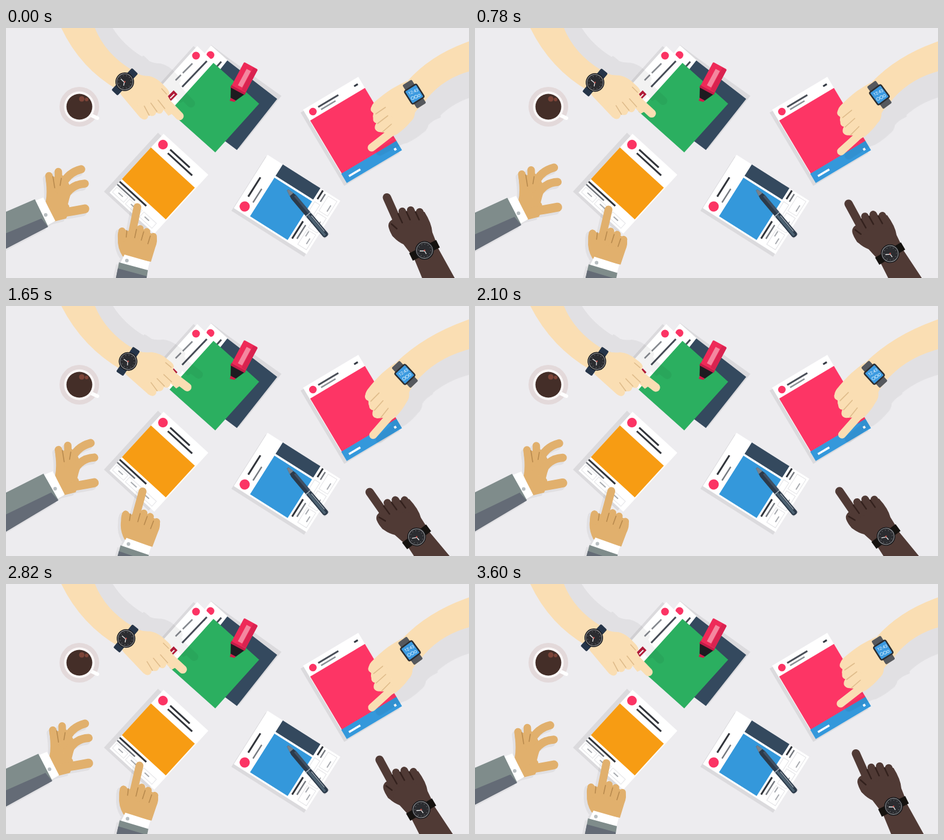
Write an HTML page that moves like this. It is 770 px wide and 416 px high and loops after 3.63 s.

```html
<!DOCTYPE html>
<html lang="en">
<head>
<meta charset="utf-8">
<title>Hands at the table</title>
<style>
html, body { margin: 0; width: 100%; height: 100%; overflow: hidden; background: #edecef; }
svg { display: block; }
.limb { fill: none; stroke-linecap: round; stroke-linejoin: round; }
.crease { fill: none; stroke-width: 1.6; stroke-linecap: round; }
.light { fill: #fadeb3; stroke: none; }
.light .limb { stroke: #fadeb3; }
.light .crease { stroke: #dfbc8b; }
.tan { fill: #e1b06d; }
.tan .limb { stroke: #e1b06d; }
.tan .crease { stroke: #b88a4e; }
.dark { fill: #503a35; }
.dark .limb { stroke: #503a35; }
.dark .crease { stroke: #33211d; stroke-width: 2.4; }
.shade { fill: #000; opacity: .075; }
</style>
</head>
<body>
<svg width="770" height="416" viewBox="0 0 770 416" xmlns="http://www.w3.org/2000/svg">
<defs>
  <filter id="shadow" x="-10%" y="-10%" width="120%" height="120%">
    <feColorMatrix values="0 0 0 0 0  0 0 0 0 0  0 0 0 0 0  0 0 0 .05 0"/>
  </filter>
  <g id="face">
    <circle r="15.5" fill="#17191d"/>
    <circle r="13.5" fill="#2b2c30" stroke="#9a9b9d" stroke-width="1"/>
    <circle r="10.5" fill="none" stroke="#85878a" stroke-width="1.4" stroke-dasharray=".8 4.7"/>
    <path d="M-8 1H0L3 6" fill="none" stroke="#e9e9e9" stroke-width="1.3"/>
    <circle r="1.3" fill="#c9504a"/>
  </g>
</defs>
<rect width="770" height="416" fill="#edecef"/>

<!-- coffee -->
<circle cx="122" cy="131" r="33" fill="#e3d9da"/>
<path d="M137 143L152 150" stroke="#fff" stroke-width="6" stroke-linecap="round"/>
<circle cx="122" cy="131" r="25.5" fill="#fbf8f8"/>
<circle cx="122" cy="131" r="21.5" fill="#442e28"/>
<circle cx="126" cy="118" r="4.5" fill="#7c4438"/>
<circle cx="134" cy="119" r="3" fill="#7c4438"/>

<!-- navy and green sheets -->
<path class="shade" d="M341 28L370 50L458 113L388 201L300 150z"/>
<path d="M341 29L369 54L300 140L272 115z" fill="#fff"/>
<path d="M368 54L451 118L384 203L300 140z" fill="#34495e"/>
<path d="M350 65L358 56" stroke="#4a4f58" stroke-width="3"/>
<circle cx="340" cy="45" r="6.5" fill="#fb3464"/>
<path class="shade" d="M312 30L341 56L270 135L240 110z"/>
<path d="M318 30L347 58L273 139L245 111z" fill="#fff"/>
<circle cx="316" cy="46" r="6.5" fill="#fb3464"/>
<g fill="none">
  <path d="M334 55L293 98" stroke="#474d57" stroke-width="3"/>
  <path d="M310 59L294 75M291 78L282 87" stroke="#868a90" stroke-width="2.5"/>
  <path d="M271 118L282 107" stroke="#b91c3c" stroke-width="9"/>
  <path d="M273 117L280 110" stroke="#fff" stroke-width="2"/>
</g>
<path d="M345 58L421 126L348 207L272 139z" fill="#2baf60"/>
<g transform="translate(376.5 121) rotate(28)">
  <path d="M-5 -5L-4 2L4 0L5 -5z" fill="#d11d48"/>
  <path d="M-13 -19H13L5 -3H-5z" fill="#1d1b20"/>
  <rect x="-13.5" y="-23" width="27" height="5" fill="#c41d49"/>
  <rect x="-13" y="-66" width="26" height="44" rx="2" fill="#ee2a58"/>
  <rect x="5" y="-65" width="8" height="42" fill="#d92350"/>
  <rect x="-4" y="-58" width="8" height="31" fill="#f4879f"/>
</g>

<!-- pink sheet -->
<g transform="translate(494 136) rotate(-30.8)">
  <rect class="shade" x="-6" y="2" width="107" height="142"/>
  <rect width="107" height="142" fill="#fff"/>
  <rect x="1" y="21.5" width="106" height="103" fill="#fd3565"/>
  <rect y="124" width="107" height="18" fill="#3498db"/>
  <circle cx="12.5" cy="11" r="6.3" fill="#fb3464"/>
  <path d="M24 9H63" stroke="#4a4f58" stroke-width="3"/>
  <path d="M26 15H54" stroke="#8d9197" stroke-width="2.5"/>
  <path d="M93 10H100" stroke="#343a44" stroke-width="3"/>
  <path d="M9 134H31" stroke="#fff" stroke-width="3.5"/>
  <rect x="96" y="133" width="4" height="4" fill="#fff"/>
</g>

<!-- orange sheet -->
<g transform="translate(262 176) rotate(42.5)">
  <rect class="shade" x="-8" y="5" width="101" height="133"/>
  <rect width="101" height="133" fill="#fff"/>
  <rect y="31" width="99" height="71.5" fill="#f79c13"/>
  <circle cx="11.5" cy="14" r="8" fill="#fb3464"/>
  <path d="M26 12H70M27 19H82M0 108H60" stroke="#33363c" stroke-width="3"/>
  <path d="M0 114H40" stroke="#6f7379" stroke-width="2.5"/>
  <path d="M11 123H21M39 123H52M70 123H80" stroke="#a8abb0" stroke-width="2"/>
  <path d="M3 118H28V129H3zM32 118H60V129H32zM64 118H92V129H64z" fill="none" stroke="#e4e4e7"/>
</g>

<!-- blue sheet -->
<g transform="translate(435 211) rotate(32.3)">
  <rect class="shade" x="-1" y="4" width="143" height="107"/>
  <rect width="143" height="105" fill="#fff"/>
  <rect x="30" width="74" height="22.5" fill="#34495e"/>
  <rect x="30" y="26" width="74" height="76" fill="#3498db"/>
  <circle cx="13.8" cy="93" r="8.5" fill="#fb3464"/>
  <path d="M10 38V76M109.5 1V18M109 62V96" stroke="#33363c" stroke-width="3"/>
  <path d="M22 53V80M116 4V19M116 65V92" stroke="#777b81" stroke-width="2.5"/>
  <path d="M134 15V27M126 71V81M134 47V58M134 80V91" stroke="#a8abb0" stroke-width="2"/>
  <path d="M122 4H139V33H122zM122 37H139V66H122zM122 70H139V99H122zM108 24H118V54H108z" fill="none" stroke="#e2e2e5"/>
</g>
<path class="shade" d="M474 283L530 351L538 343L484 279z"/>
<g transform="translate(468.5 269.5) rotate(50)">
  <path d="M0 -1.5L15 -5H97Q101 -5 101 0T97 5H15L0 1.5z" fill="#2c3a4a"/>
  <path d="M54 -1H98V3H54z" fill="#4d6272"/>
  <path d="M15 -5H52V-1H15z" fill="#3f5165"/>
  <path d="M53 -5V5" stroke="#a8b1ba" stroke-width="1.5"/>
  <path d="M58 -2.500H92" stroke="#9ba6b0" stroke-width="1.500"/>
  <path d="M0 -1.500L10 -4V4L0 1.500z" fill="#77818c"/>
</g>

<use href="#topLeft" x="19" y="-21" filter="url(#shadow)"/>
<use href="#topRight" transform="rotate(10 575 280)" filter="url(#shadow)"/>
<use href="#sleeved" x="-4" y="5" filter="url(#shadow)"/>
<use href="#below" x="-5" y="3" filter="url(#shadow)"/>

<g id="topLeft" class="light">
  <path id="armLeft"/>
  <g id="handLeft">
    <path d="M184 99L209 67Q218 80 238 80Q252 83 264 97Q276 108 269 113L284 139L270 146L262 136Q258 143 252 140L246 143Q240 148 235 145Q232 156 223 149L192 112z"/>
    <path class="limb" d="M262 119L288.500 146.500" stroke-width="14"/>
    <path class="limb" d="M248 127L255 136M236 130L243 140M222 134L230 146" stroke-width="13"/>
    <path class="crease" d="M241 125L251 139M230 130L238 145M253 120L264 134M259 101L267 110"/>
    <g transform="translate(197.500 89.500) rotate(43)">
      <rect x="-7" y="-25" width="14" height="50" rx="2" fill="#263549"/>
      <use href="#face"/>
    </g>
  </g>
</g>

<g id="topRight" class="light">
  <path id="armRight"/>
  <g id="handRight">
    <path d="M667 88Q654 94 642 101Q628 110 613 123Q603 133 611 142Q608 152 616 158Q609 169 620 173L630 174L640 181L650 177Q664 167 672 157Q680 150 680 141Q685 133 696 126z"/>
    <path class="limb" d="M644 171L608 199" stroke-width="13"/>
    <path class="limb" d="M630 123L613 135M633 139L617 152M638 153L621 166" stroke-width="13"/>
    <path class="crease" d="M631 132L615 143M635 146L618 159M641 160L626 173"/>
    <g transform="translate(679 110) rotate(-32)">
      <rect x="-9" y="-23" width="18" height="46" rx="2" fill="#55585d"/>
      <rect x="-13" y="-14" width="26" height="28" rx="4" fill="#2b2d31"/>
      <rect x="-10.500" y="-11.500" width="21" height="23" rx="1" fill="#3c9ae0"/>
      <g transform="rotate(10)">
        <text y="-2" font-family="Roboto, sans-serif" font-size="7" text-anchor="middle" fill="#fff">12:43</text>
        <g fill="none" stroke="#b9e0f8"><circle cx="-5" cy="5" r="2.500"/><circle cx="1" cy="5" r="2.500"/><circle cx="6.500" cy="5" r="2"/></g>
      </g>
    </g>
  </g>
</g>

<g id="sleeved" class="tan">
  <path d="M66 289Q69 275 66 250L94 245L104 258Q111 270 105 285L103 293Q109 298 100 317L80 322z"/>
  <path class="limb" d="M71.500 246L76 276M87 239L88 270" stroke-width="12.500"/>
  <path class="limb" d="M91 270Q98 242 125 235" stroke-width="13.500"/>
  <path class="limb" d="M96 283Q108 260 131 259" stroke-width="13.500"/>
  <path class="limb" d="M90 308Q105 306 131 301" stroke-width="15"/>
  <path class="crease" d="M78 247L81 266M92 250L90 262"/>
  <path d="M47 288L62 282L82 321L68 329z" fill="#fff"/>
  <circle cx="66" cy="311" r="3" fill="#b9bfc2"/>
  <g id="sleeve">
    <path d="M-40 323L48 285L70 330L-40 388z" fill="#7f8c8b"/>
    <path d="M-40 358L59 317L70 331L-40 388z" fill="#646b76"/>
  </g>
</g>

<g id="below" class="tan">
  <path d="M186 350Q185 333 193 332L202 338L218 330L250 346Q253 354 248 366L241 389L194 380Q185 366 186 350z"/>
  <path class="limb" d="M218.500 298L209 345" stroke-width="13"/>
  <path class="limb" d="M193 338L194 350" stroke-width="12"/>
  <path class="limb" d="M223 334L218 352M234 339L230 355M245 347L240 363" stroke-width="12"/>
  <path class="crease" d="M201 337L200 348M217 335L214 349M229 339L225 353M240 346L236 359"/>
  <path d="M197 377L239 389L235 404L190 392z" fill="#fff"/>
  <circle cx="201" cy="387" r="3" fill="#b9bfc2"/>
  <path d="M188 390L236 403L230 440H178z" fill="#7f8c8b"/>
  <path d="M186 400L234 413L230 440H178z" fill="#646b76"/>
</g>

<g id="deep" class="dark">
  <path d="M644 318Q633 323 637 334Q642 351 661 360L678 382L706 450H765L719 367Q714 352 709 340Q708 325 696 306L657 304z"/>
  <path class="limb" d="M633.500 282L654 328" stroke-width="14"/>
  <path class="limb" d="M659 305L666 323M673 303L680 320M688 306L695 323" stroke-width="12.500"/>
  <path class="limb" d="M642 329L647 343" stroke-width="11"/>
  <path class="crease" d="M652 309L659 324M666 306L672 319M681 306L687 319M641 326L650 334"/>
  <g transform="translate(696 370) rotate(64)">
    <rect x="-7" y="-25" width="14" height="50" fill="#15120f"/>
    <use href="#face" transform="rotate(-64)"/>
  </g>
</g>
</svg>
<script>
const el = id => document.getElementById(id);
const LOOP = 3630, SWING = 3600, STEP = 30;

// Swinging parts: pivot and full turn in degrees
const turns = {
  handLeft: [218, 54, -8.7],
  handRight: [691, 193, -11.2],
  below: [69, 431, 3.95],
  deep: [763, 445, -11.2],
  sleeve: [60, 308, -3.5]
};

// Each arm edge: wrist, bend, and the end that stays outside the stage
const arms = {
  armLeft: ['handLeft', [[186, 103], [123, 67], [91, -2]], [[208, 69], [164, 42], [147, -2]]],
  armRight: ['handRight', [[668, 88], [708, 43], [774, 21]], [[694, 126], [722, 85], [774, 71]]]
};

function spin([x, y], [cx, cy, deg], amount) {
  const a = deg * amount * Math.PI / 180, c = Math.cos(a), s = Math.sin(a);
  const dx = x - cx, dy = y - cy;
  return [cx + dx * c - dy * s, cy + dx * s + dy * c];
}

function armPath([hand, a, b], p) {
  const follow = ([wrist, bend, end]) => {
    const w = spin(wrist, turns[hand], p);
    const k = [bend[0] + (w[0] - wrist[0]) / 2, bend[1] + (w[1] - wrist[1]) / 2];
    return [w, k, end];
  };
  const [w1, k1, e1] = follow(a), [w2, k2, e2] = follow(b);
  return `M${w1}Q${k1} ${e1}L${e2}Q${k2} ${w2}z`;
}

function draw(ms) {
  const t = Math.floor(ms % LOOP / STEP) * STEP;
  const p = (1 - Math.cos(2 * Math.PI * t / SWING)) / 2;
  for (const [id, [x, y, deg]] of Object.entries(turns))
    el(id).setAttribute('transform', `rotate(${deg * p} ${x} ${y})`);
  for (const [id, arm] of Object.entries(arms))
    el(id).setAttribute('d', armPath(arm, p));
  el('sleeved').setAttribute('transform', `translate(${16 * p} ${-7 * p})`);
}

let start;
function tick(now) {
  start ??= now;
  draw(now - start);
  requestAnimationFrame(tick);
}
draw(0);
requestAnimationFrame(tick);
</script>
</body>
</html>
```
